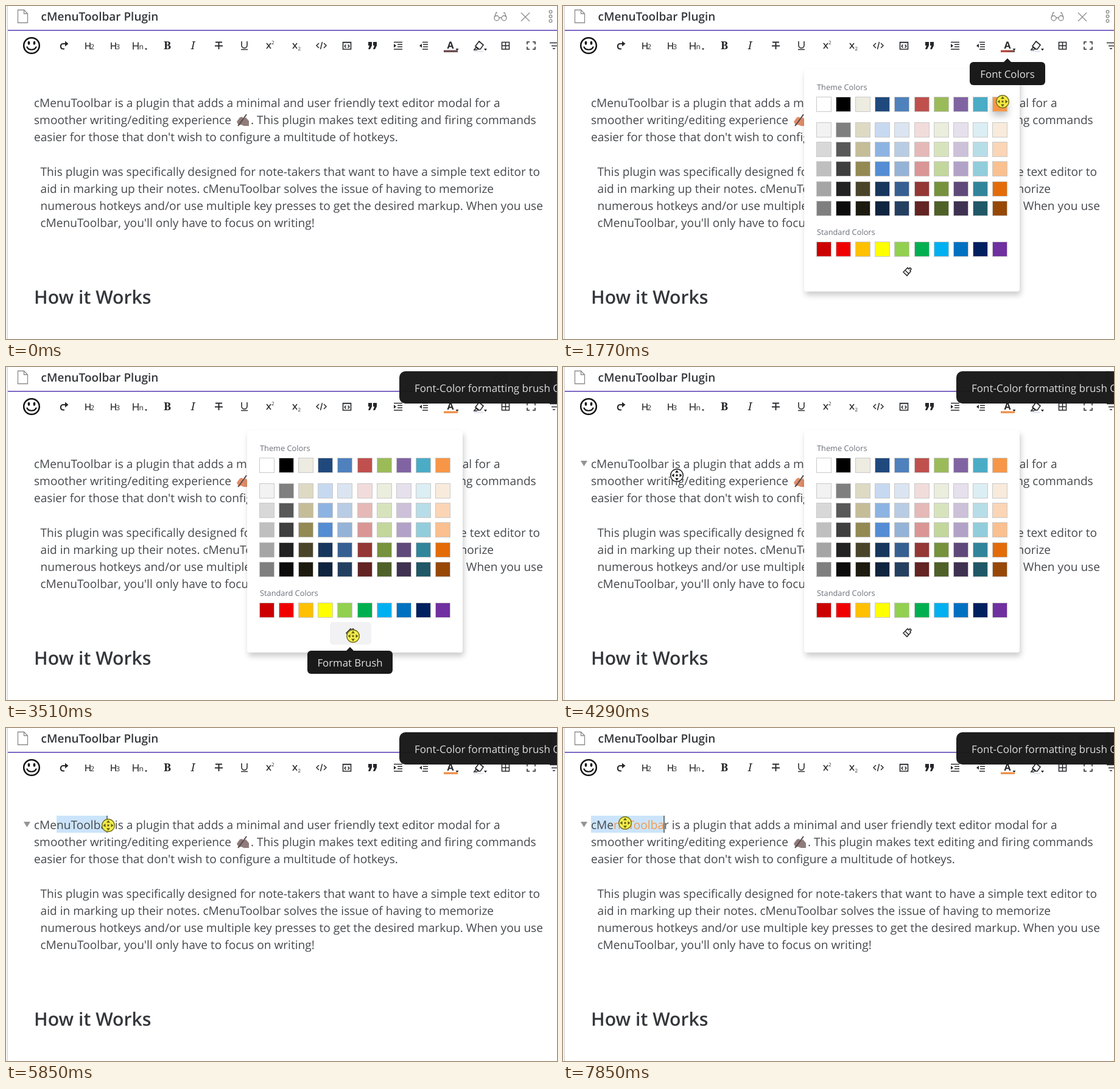
Write an HTML page that moves like this. It is 905 by 547 pixels and loops after 8000 ms.

```html
<!DOCTYPE html>
<html lang="en">
<head>
<meta charset="utf-8">
<title>Editor toolbar</title>
<style>
  html, body { margin: 0; width: 100%; height: 100%; overflow: hidden; background: #fff; }
  svg { display: block; width: 100vw; height: 100vh; font-family: "Open Sans", "Noto Sans", sans-serif; text-rendering: geometricPrecision; }
  .body { font-size: 19.12px; fill: #45484c; }
  .head { font-weight: 600; fill: #33363b; }
  .label { font-size: 12.8px; fill: #6c717a; }
  .tip text { font-size: 16.8px; fill: #e0e0e0; text-anchor: middle; }
  .tip { fill: #1a1a1a; }
  .line { fill: none; stroke: #2b2d30; stroke-width: 1.6; }
  .soft { fill: none; stroke: #8b8b8b; stroke-width: 1.3; }
  .serif { font-family: "Noto Serif", "Liberation Serif", serif; font-size: 18px; text-anchor: middle; }
  .small { font-size: 11.5px; }
  #popup > rect:first-child { filter: drop-shadow(2px 6px 5px rgba(0, 0, 0, .2)); }
</style>
</head>
<body>
<svg viewBox="0 0 905 547" preserveAspectRatio="none">
  <defs>
    <linearGradient id="fade"><stop offset=".3" stop-color="#c0483e"/><stop offset="1" stop-color="#70504f"/></linearGradient>
  </defs>
  <path d="M0 0h2v547H0z" fill="#f6f6f6"/>
  <path d="M2.500 0V547" stroke="#cfcfcf"/>
  <path d="M3 40H905" stroke="#7d68c4" stroke-width="2"/>

  <!-- title bar -->
  <path class="soft" d="M19.500 6.500h10l6 6v15h-16zM29.500 6.500v6h6"/>
  <text class="head" x="57.500" y="23.500" font-size="19">cMenuToolbar Plugin</text>
  <g class="soft">
    <circle cx="806" cy="20" r="4"/><circle cx="818" cy="20" r="4"/>
    <path d="M810 20q2-2 4 0M802 19l3-8h2M822 19l-3-8h-2M846 11l14 14M860 11l-14 14"/>
    <circle cx="894.500" cy="9.500" r="2.300"/><circle cx="894.500" cy="17" r="2.300"/><circle cx="894.500" cy="24.500" r="2.300"/>
  </g>

  <!-- toolbar -->
  <g class="line">
    <circle cx="42" cy="65" r="12.800" stroke="#111" stroke-width="2.500"/>
    <path d="M34.500 67.500a8 6.500 0 0 0 15 0" stroke="#111" stroke-width="2.200" stroke-linecap="round"/>
    <path d="M37.500 59.500v2.500M46.500 59.500v2.500" stroke="#111" stroke-width="3.500" stroke-linecap="round"/>
    <path d="M96 70.500h-2.500a4.300 4.300 0 0 1 0-8.500h4" stroke-width="2.200"/>
    <path d="M131 60v11M138 60v11M131 65.500h7M173 60v11M180 60v11M173 65.500h7M209 59.500v12M217 59.500v12M209 65.500h8"/>
    <path d="M344 59.500h11M349.500 59v12M343 65.500h13" stroke-width="2"/>
    <path d="M387 58v6.500a4.500 4.500 0 0 0 9 0V58M386 71.500h11"/>
    <path d="M428 61l7 9M435 61l-7 9M471 61l7 9M478 61l-7 9"/>
    <path d="M514 61l-4 4 4 4M522 61l4 4-4 4M519.500 59l-3 12" stroke-width="1.500"/>
    <path d="M553.500 59.500h13v11.500h-13zM553 60h14M558.500 63.500l-2.300 2.500 2.300 2.500M561.500 63.500l2.300 2.500-2.300 2.500"/>
    <path d="M637 59.500h14M643 63.200h8M643 67h8M637 71h14M684 59.500h9M685 63.200h8M685 67h8M684 71h9"/>
    <path d="M771 66l6-8 7 6-5 7h-4zM771 66l6 5M772 68l-3 4h5" stroke-width="1.700"/>
    <path d="M814.500 59.500h12v11.500h-12zM814 65.300h13M820.500 59v12M817 65.300h7"/>
    <path d="M860 59h-4v4M865 59h4v4M856 67v4h4M869 67v4h-4"/>
    <path d="M893 60.500h14M896 65.500h10M898 70h4"/>
  </g>
  <path d="M768 74.500h16" stroke="#dfe1ee" stroke-width="2"/>
  <g fill="#26282b">
    <path d="M97 57.500l5.500 4.500-5.500 4.500zM637 62l4 3.200-4 3.200zM683 62l-4 3.200 4 3.200z"/>
    <path d="M228 69.500h4l-2 3zM738.500 70h5l-2.500 3.500zM785 70h5l-2.500 3.500z"/>
    <path id="quote" d="M595 59h6v6l-3 6h-3l2-6h-2z"/><use href="#quote" x="8"/>
    <text class="small" x="138.500" y="71">2</text><text class="small" x="180.500" y="71">3</text>
    <text font-size="12" x="218.500" y="71">n</text>
    <text font-size="8" x="436" y="63">2</text><text font-size="8" x="479.500" y="73">2</text>
    <text class="serif" font-weight="700" x="265" y="71">B</text>
    <text class="serif" font-style="italic" x="307" y="71">I</text>
    <text x="730" y="70" font-size="16" font-weight="700" text-anchor="middle">A</text>
  </g>
  <rect id="underline" x="719" y="72.500" width="23" height="3.500"/>

  <!-- note -->
  <path id="fold" d="M29 154h11l-5.500 9z" fill="#949494"/>
  <rect id="selection" y="144" height="28" fill="#cbe4fb"/>
  <g class="body">
    <text id="first" x="46" y="166">cMe<tspan id="painted">nuToolba</tspan>r is a plugin that adds a minimal and user friendly text editor modal for a</text>
    <text x="46" y="194">smoother writing/editing experience</text>
    <text x="402" y="194">. This plugin makes text editing and firing commands</text>
    <text x="46" y="222">easier for those that don't wish to configure a multitude of hotkeys.</text>
    <text x="56.500" y="279">This plugin was specifically designed for note-takers that want to have a simple text editor to</text>
    <text x="56.500" y="307">aid in marking up their notes. cMenuToolbar solves the issue of having to memorize</text>
    <text x="56.500" y="335">numerous hotkeys and/or use multiple key presses to get the desired markup. When you use</text>
    <text x="56.500" y="363">cMenuToolbar, you'll only have to focus on writing!</text>
  </g>
  <path id="hand" d="M379 190l5-7 4-1 2 3 4-2 5 6v8h-8l-5-2-4 1z"/>
  <path d="M381 197l4-5 10-14" fill="none" stroke="#55494a" stroke-width="2"/>
  <text class="head" x="46" y="489" font-size="30.200">How it Works</text>
  <path id="caret" d="M0 144v28" stroke="#222" stroke-width="1.200"/>

  <!-- colour popup -->
  <g id="popup">
    <rect x="396" y="104" width="354" height="365" rx="4" fill="#fff"/>
    <text class="label" x="417" y="138">Theme Colors</text>
    <text class="label" x="417" y="376">Standard Colors</text>
    <g id="swatches" stroke="#c9c9c9"></g>
    <rect id="hover" x="532" y="419" width="68" height="37" rx="5" fill="#f2f2f4"/>
    <path class="line" d="M559 437l7-7 2 2 2-2 2 2-2 3 1 1-6 7zM562 434l6 6" stroke-width="1.500"/>
  </g>
  <g id="colorTip" class="tip">
    <rect x="668" y="92" width="124" height="38" rx="6"/><path d="M723 93l7-7 7 7z"/>
    <text x="730" y="118">Font Colors</text>
  </g>
  <g id="brushTip" class="tip">
    <rect x="495" y="466" width="140" height="38" rx="6"/><path d="M558 467l7-7 7 7z"/>
    <text x="565" y="492">Format Brush</text>
  </g>
  <g id="notice">
    <rect x="646" y="7" width="290" height="53" rx="10" fill="#171717" fill-opacity=".97"/>
    <text x="671" y="41" font-size="17" fill="#dcdcdc">Font-Color formatting brush ON!</text>
  </g>
  <g id="cursor">
    <circle id="disc" r="10.300" stroke-width="1.400"/>
    <path id="arrows" d="M0-8.500l3 4h-6zM0 8.500l3-4h-6zM-8.500 0l4 3v-6zM8.500 0l-4 3v-6zM-1.500-1.500h3v3h-3z"/>
  </g>
</svg>
<script>
const el = id => document.getElementById(id);
const show = (id, on) => el(id).style.display = on ? '' : 'none';
const set = (id, attrs) => { for (const a in attrs) el(id).setAttribute(a, attrs[a]); };

const palette = [
  [162, 'ffffff 000000 eeece1 1f497d 4f81bd c0504d 9bbb59 8064a2 4bacc6 f79646'],
  [204, 'f2f2f2 7f7f7f ddd9c3 c6d9f0 dbe5f1 f2dcdb ebeddd e5e0ec dbeef3 f8ebdc'],
  [236, 'd8d8d8 595959 c4bd97 8db3e2 b8cce4 e5b9b7 d7e3bc ccc1d9 b7dde8 fbd5b5'],
  [268, 'bfbfbf 3f3f3f 938953 548dd4 95b3d7 d99694 c3d69b b2a2c7 92cddc fac08f'],
  [301, 'a5a5a5 222222 494429 17365d 366092 953734 76923c 5f497a 31859b e36c09'],
  [333, '7f7f7f 0c0c0c 1d1b10 0f243e 244061 632423 4f6128 3f3151 205867 974806'],
  [400, 'cc0000 f00000 ffc000 ffff00 92d050 00b050 00b0f0 0070c0 002060 7030a0']
];
el('swatches').innerHTML = palette.map(([y, colors]) => colors.split(' ').map((c, i) =>
  `<rect x="${Math.round(416 + 32.1 * i) + .5}" y="${y - 12.5}" width="24" height="24" fill="#${c}"/>`
).join('')).join('');
const orange = el('swatches').children[9];

// Cursor way points: step, x, y
const path = [
  [0, 778, 96], [2, 733, 72], [6, 733, 74], [8, 727, 110], [9, 722, 157], [10, 722, 157],
  [12, 557, 268], [13, 550, 330], [15, 566, 432], [17, 570, 442], [21, 570, 442], [23, 470, 330],
  [26, 187, 178], [28, 70, 162], [30, 84, 160], [31, 102, 160], [33, 150, 160], [36, 168, 160],
  [39, 168, 160], [42, 245, 169], [45, 66, 164], [46, 49, 160], [48, 102, 156], [50, 102, 156]
];
const presses = [[2, 3], [9, 10], [20, 21], [30, 38], [47, 50]];

function cursorAt(step) {
  const i = Math.max(1, path.findIndex(p => p[0] >= step));
  const [a, b] = [path[i - 1], path[i]];
  const f = (step - a[0]) / (b[0] - a[0]);
  return [a[1] + (b[1] - a[1]) * f, a[2] + (b[2] - a[2]) * f];
}

const charX = i => el('first').getStartPositionOfChar(i).x;

function selectionAt(step, x) {
  if (step >= 48) return [charX(0), charX(11)];
  if (step < 30 || step >= 39) return null;
  let end = 3;
  while (end < 11 && charX(end + 1) <= x - 1) end++;
  return [charX(3), charX(end)];
}

function draw() {
  const step = Math.floor((performance.now() % 8000 - 190) / 156.2);
  const within = (a, b) => step >= a && step <= b;
  const open = within(3, 29);

  show('popup', open);
  show('colorTip', within(1, 11));
  show('brushTip', within(16, 21));
  show('hover', within(15, 21));
  show('notice', step >= 21);
  show('fold', step >= 25);
  orange.style.filter = within(9, 11) ? 'drop-shadow(0 6px 6px rgba(0,0,0,.25))' : '';
  set('hand', { fill: open ? '#df8d69' : '#8f7c7a' });
  set('underline', { fill: step >= 11 ? '#ee9450' : open ? 'url(#fade)' : '#6d4d50' });
  set('painted', { fill: step >= 39 ? '#f2994e' : '#45484c' });

  show('cursor', step >= 0);
  const [x, y] = cursorAt(Math.max(0, step));
  const pressed = presses.some(p => within(...p));
  set('cursor', { transform: `translate(${x} ${y})` });
  set('disc', pressed ? { fill: '#f5ee45', 'fill-opacity': .95, stroke: '#77731f' }
                      : { fill: '#fff', 'fill-opacity': 1, stroke: '#222' });
  set('arrows', { fill: pressed ? '#5d5a18' : '#111' });

  const range = selectionAt(step, x);
  show('selection', range);
  show('caret', range);
  if (range) {
    set('selection', { x: range[0], width: range[1] - range[0] });
    set('caret', { transform: `translate(${range[1]} 0)` });
  }
  requestAnimationFrame(draw);
}
draw();
</script>
</body>
</html>
```
